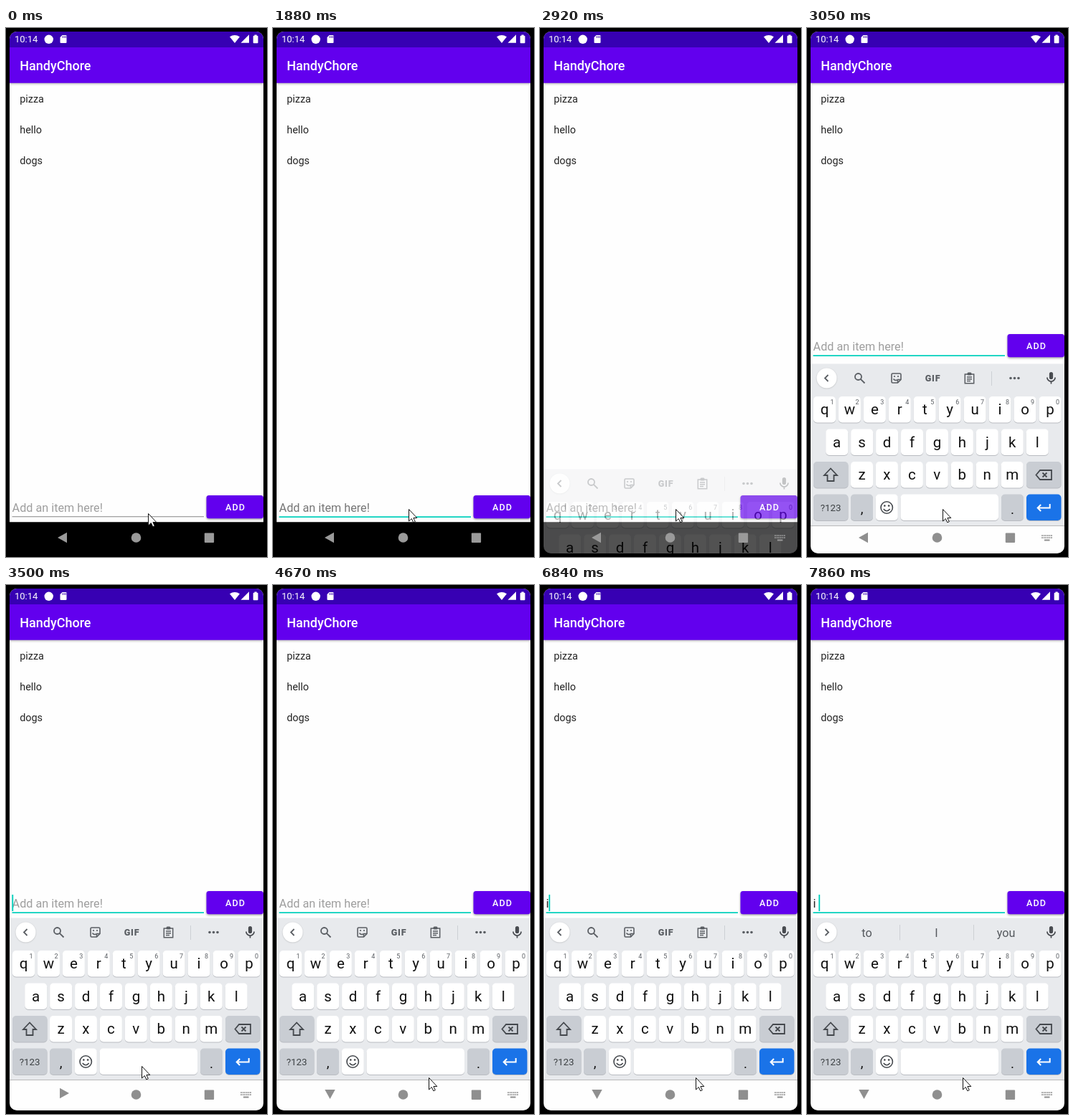
Recreate the animation shown at these times as an HTML page with a canvas. Size 364x738 px, loop 8000 ms.

```html
<!DOCTYPE html>
<html lang="en">
<head>
<meta charset="utf-8">
<title>To-do list</title>
<style>
html, body { margin: 0; width: 100%; height: 100%; overflow: hidden; background: #000; }
canvas { display: block; }
</style>
</head>
<body>
<canvas id="stage" width="364" height="738"></canvas>
<script>
const W = 364, H = 738, LOOP = 8000;
const PURPLE = '#6200ee', TEAL = '#03d0bd', PAPER = '#fefefe', ICON = '#5a5e63';
const FIELD_LIFT = 225;

const screen = document.getElementById('stage').getContext('2d');
const layer = document.createElement('canvas');
layer.width = W;
layer.height = H;
const board = layer.getContext('2d');
let g = screen; // context the helpers draw on

// Step timelines: [start, value...]
const pointer = [[0, 198, 677], [150, 197, 675], [300, 194, 674], [420, 191, 672],
  [550, 189, 671], [3800, 204, 680], [3930, 217, 687]];
const caretOn = [[0, 0], [2010, 1], [2470, 0], [3500, 1], [3660, 0], [4230, 1], [4670, 0],
  [5100, 1], [5670, 0], [6120, 1], [6560, 0], [6840, 1]];
const slide = [[0, 0, 0], [2920, 151, .32], [3050, 4, 1], [3500, 0, 1]]; // offset, opacity
const backKey = [[0, 78.5, 711, 0], [3500, 81.5, 709, Math.PI], [3660, 79.5, 710.5, -Math.PI / 2]];
const hintColor = [[0, '#9e9e9e'], [1880, '#767676'], [2150, '#9e9e9e']];
const typed = [[0, ''], [6840, 'i'], [7430, 'i ']];
const wordAlpha = [[0, 0], [7730, .5], [7860, 1]];

const at = (steps, t) => steps.filter(s => s[0] <= t).pop().slice(1);

function box(x, y, w, h, color, r = 0) {
  g.fillStyle = color;
  g.beginPath();
  g.roundRect(x, y, w, h, r);
  g.fill();
}

function disc(x, y, r, color) {
  g.fillStyle = color;
  g.beginPath();
  g.arc(x, y, r, 0, 7);
  g.fill();
}

function text(str, x, y, size, color, align = 'left', weight = 400, spacing = 0) {
  g.font = `${weight} ${size}px Roboto, sans-serif`;
  g.letterSpacing = spacing + 'px';
  g.textAlign = align;
  g.fillStyle = color;
  g.fillText(str, x, y);
}

function shape(x, y, d, { fill, stroke, width = 1.8, turn = 0 }) {
  const path = new Path2D(d);
  g.save();
  g.translate(x, y);
  g.rotate(turn);
  if (fill) { g.fillStyle = fill; g.fill(path); }
  if (stroke) { g.strokeStyle = stroke; g.lineWidth = width; g.stroke(path); }
  g.restore();
}

function shadowed(color, blur, y, draw) {
  g.save();
  g.shadowColor = color;
  g.shadowBlur = blur;
  g.shadowOffsetY = y;
  draw();
  g.restore();
}

function key(x, y, w, color = '#fff') {
  box(x, y + 1, w, 36.5, '#b9bcc1', 5);
  box(x, y, w, 36.5, color, 5);
}

function letters(row, firstX, y) {
  [...row].forEach((ch, i) => {
    const x = firstX + i * 34.94;
    key(x - 15.5, y, 31);
    text(ch, x, y + 25, 20.5, '#111', 'center');
    if (row.length === 10) text((i + 1) % 10, x + 10.5, y + 10.5, 9, ICON, 'center');
  });
}

function toolbar(t) {
  const y = 484.5, line = { stroke: ICON };
  const words = t >= 7430;
  shadowed('rgba(0,0,0,.2)', 2, .5, () => disc(27.5, y, 14, '#fff'));
  shape(27.5, y, 'M2-4.5L-2.5 0L2 4.5', { ...line, turn: words ? Math.PI : 0 });
  shape(340.5, y, 'M-2.6-6A2.6 2.6 0 0 1 2.6-6V-1A2.6 2.6 0 0 1-2.6-1Z', { fill: '#484b50' });
  shape(340.5, y, 'M-5.6-1A5.6 5.6 0 0 0 5.6-1M0 4.5V8', { stroke: '#484b50', width: 1.7 });

  if (words) {
    for (const x of [129, 232]) box(x, 474, 1, 21.5, '#cdd0d4');
    g.globalAlpha = at(wordAlpha, t)[0];
    ['to', 'I', 'you'].forEach((w, i) => text(w, 83.5 + i * 97, 490.5, 16.2, '#55595e', 'center'));
    g.globalAlpha = 1;
    return;
  }
  shape(73.5, y, 'M2.5-2A4.5 4.5 0 1 1-6.5-2A4.5 4.5 0 1 1 2.5-2M1.3 1.3L7 7', line);
  shape(124.5, y, 'M-6.5-5Q-6.5-6.5-5-6.5H5Q6.5-6.5 6.5-5V2L2 6.5H-5Q-6.5 6.5-6.5 5ZM6.5 2H2V6.5M-4 1Q-2 4 1 2.5',
    { ...line, width: 1.6 });
  disc(122, 482, 1.1, ICON);
  disc(127, 482, 1.1, ICON);
  text('GIF', 175.5, 489, 12.6, ICON, 'center', 900, .8);
  shape(226.5, y, 'M-6.2-5.5H6.2V7.3H-6.2ZM-3.5-1.5H3.5M-3.5 1.3H3.5M-3.5 4H1.5', { ...line, width: 1.5 });
  box(223.5, 476.5, 6, 4, ICON, 1.5);
  box(257, 475, 1, 20, '#cdd0d4');
  for (const x of [284, 289.5, 295]) disc(x, y, 1.8, ICON);
}

function keyboard(t) {
  const grey = '#c9cdd3', dark = '#3c4043', line = { stroke: '#44484d' };
  g.clearRect(0, 0, W, H);
  box(0, 464.5, W, 226, '#e8eaed');
  box(0, 690.5, W, 50, PAPER);
  toolbar(t);

  letters('qwertyuiop', 24.5, 510);
  letters('asdfghjkl', 41.7, 555.5);
  letters('zxcvbnm', 76.5, 601);
  key(9, 601, 48.5, grey);
  shape(33, 619.5, 'M0-9L-9 .5H-4.5V8.5H4.5V.5H9Z', line);
  key(306, 601, 48.5, grey);
  shape(330.5, 619.5, 'M-11 0L-5.5-6.5H10.5V6.5H-5.5ZM-2-3L4 3M4-3L-2 3', line);

  key(9, 646.5, 48.5, grey);
  text('?123', 33, 670, 13.3, dark, 'center');
  key(61, 646.5, 31, grey);
  text(',', 76.5, 672.5, 19, '#111', 'center');
  key(95.8, 646.5, 31);
  shape(111.2, 665, 'M8.2 0A8.2 8.2 0 1 1-8.2 0A8.2 8.2 0 1 1 8.2 0M-4.5 2Q0 7.5 4.5 2', { ...line, width: 1.6 });
  disc(108.3, 662.5, 1.3, dark);
  disc(114.1, 662.5, 1.3, dark);
  key(130.5, 646.5, 136.5);
  key(271, 646.5, 31, grey);
  text('.', 286.5, 674, 19, '#111', 'center');
  key(306, 646.5, 48.5, '#1a73e8');
  shape(330.2, 665, 'M8.5-5V.5H-8M-4-4L-8.5 .5L-4 5', { stroke: '#fff', width: 2 });
}

function header() {
  shadowed('rgba(0,0,0,.3)', 3, 1, () => box(5, 27, 354, 49.8, PURPLE));
  box(5, 5, 354, 22, '#3700b3');
  text('10:14', 12, 20.3, 13, '#fff');
  disc(59.7, 15.8, 6.2, '#fff');
  shape(80, 15.5, 'M-1.5-5.5H3.5Q4.5-5.5 4.5-4.5V4.5Q4.5 5.5 3.5 5.5H-3.5Q-4.5 5.5-4.5 4.5V-2.5Z', { fill: '#fff' });
  for (const x of [78.6, 80.7, 82.7]) box(x, 11.2, 1, 2.5, '#3700b3');
  shape(319, 21, 'M0 0L-7-8.7Q0-13.5 7-8.7Z', { fill: '#fff' });
  shape(339, 20.7, 'M0 0H-11.5L0-11.5Z', { fill: '#fff' });
  box(344.7, 10.7, 6.8, 10.5, '#fff', 1);
  box(346.5, 9.5, 3.2, 2, '#fff');
  text('HandyChore', 19.2, 58.8, 18, '#fff', 'left', 500);
}

function field(t) {
  const value = at(typed, t)[0];
  g.save();
  if (t >= 3050) g.translate(0, -FIELD_LIFT);
  if (value) text(value, 8.6, 675.3, 16.2, '#212121');
  else text('Add an item here!', 8.6, 675.3, 16.2, at(hintColor, t)[0]);
  if (t >= 7130 && t < 7730) box(8.6, 676.5, 4, 1, '#212121');
  if (t < 1880) box(8.5, 681.3, 267.5, 1, '#858585');
  else box(8.5, 681.3, 267.5, 1.8, TEAL);
  if (at(caretOn, t)[0]) {
    g.font = '16.2px Roboto, sans-serif';
    g.letterSpacing = '0px';
    box(8.3 + g.measureText(value).width, 657, 1.9, 23, TEAL);
  }
  shadowed('rgba(0,0,0,.35)', 3, 1.5, () => box(279.5, 652, 79.5, 32.3, PURPLE, 3.6));
  text('ADD', 320, 672.6, 12.6, '#fff', 'center', 500, 1.125);
  g.restore();
}

function navigation(t) {
  const color = t < 3050 ? '#9a9a9a' : '#8f8f8f';
  const [x, y, turn] = at(backKey, t);
  shape(x, y, 'M-6.5 0L6.5-7.2V7.2Z', { fill: color, turn });
  disc(181.5, 711, 6.8, color);
  box(276.8, 704.6, 13.3, 13.3, color, 1);
  if (t < 2620) return;
  for (let i = 0; i < 12; i++) box(327.2 + i % 6 * 2.6, 707.3 + (i / 6 | 0) * 3, 1.7, 1.7, color);
  box(331, 713.6, 7.5, 1.8, color);
}

function draw(t) {
  const [dy, alpha] = at(slide, t);
  if (alpha) {
    g = board;
    keyboard(t);
    g = screen;
  }
  box(0, 0, W, H, '#000');
  g.save();
  g.beginPath();
  g.roundRect(5, 5, 354, 728, 10);
  g.clip();
  box(5, 5, 354, 684.5, PAPER);
  header();
  ['pizza', 'hello', 'dogs'].forEach((item, i) => text(item, 19.2, 104 + i * 43.2, 14.4, '#242424'));
  field(t);
  if (!alpha) box(5, 689.5, 354, 44, '#000');
  else {
    box(5, 689.5, 354, 44, '#000');
    g.globalAlpha = alpha;
    g.drawImage(layer, 0, dy);
    g.globalAlpha = 1;
  }
  navigation(t);
  g.restore();
  const [px, py] = at(pointer, t);
  shape(px + .5, py + .5, 'M0 0V16.5L3.8 13L6.3 18.3L8.8 17.2L6.4 12H11.3Z', { fill: '#fff', stroke: '#111', width: 1 });
}

function tick() {
  draw(performance.now() % LOOP);
  requestAnimationFrame(tick);
}
tick();
</script>
</body>
</html>
```
